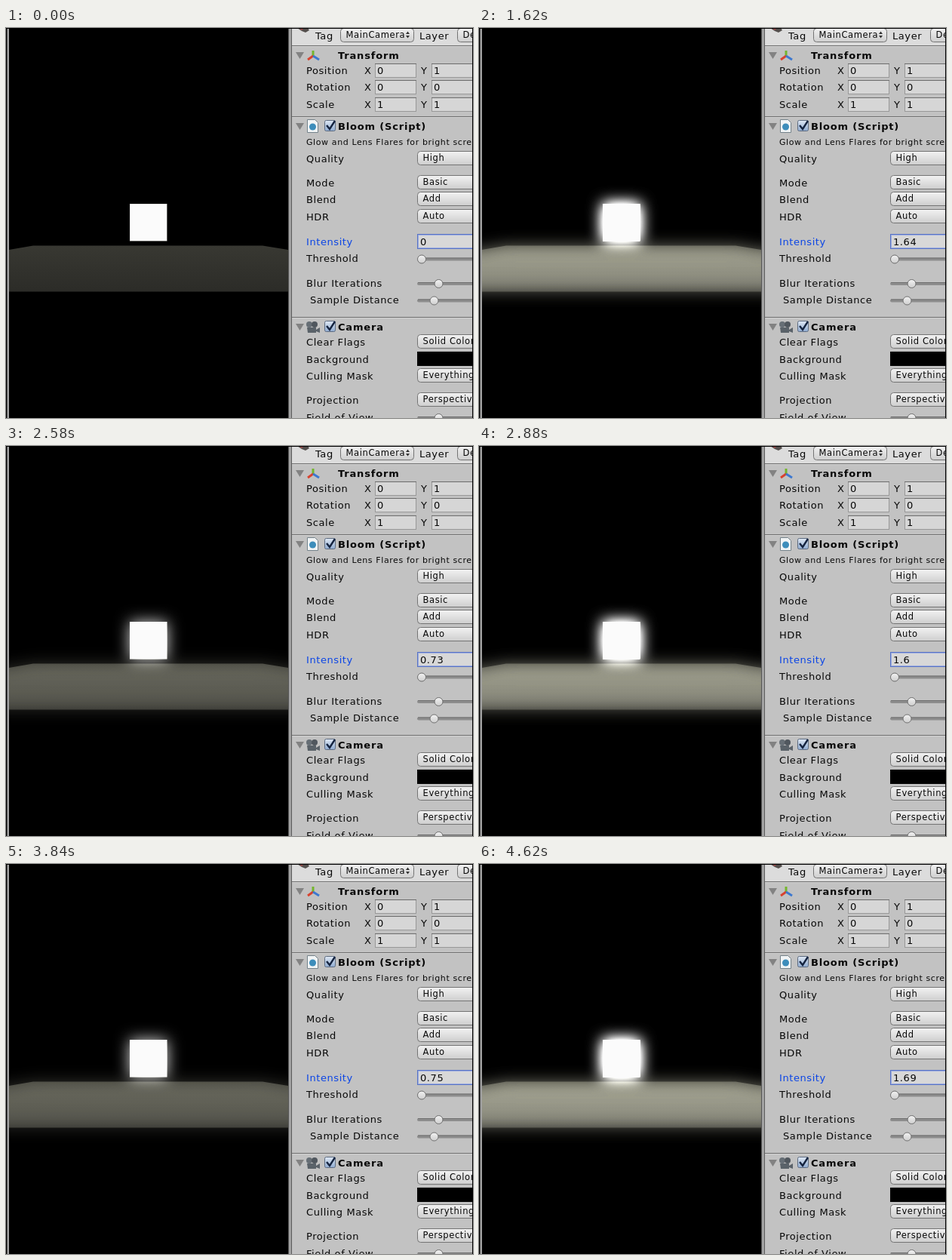
Recreate the animation shown at these times as an HTML page with a canvas. Size 619 by 517 pixels, loop 5760 ms.

```html
<!DOCTYPE html>
<html lang="en">
<head>
<meta charset="utf-8">
<title>Bloom intensity</title>
<style>
  html, body { margin: 0; width: 100%; height: 100%; overflow: hidden; background: #000; }
  canvas, svg { position: absolute; left: 0; top: 0; display: block; }
  text { font-family: "DejaVu Sans", sans-serif; font-size: 13px; letter-spacing: .58px; fill: #080808; white-space: pre; }
  .head { font-weight: bold; letter-spacing: .82px; }
  .small { font-size: 11px; letter-spacing: .6px; }
  .pick { font-size: 11.5px; letter-spacing: .62px; }
  .active { fill: #0b45e6; }
</style>
</head>
<body>
<canvas id="scene" width="619" height="517"></canvas>
<svg id="panel" width="619" height="517" viewBox="0 0 619 517"></svg>
<script>
const LOOP = 5760, STEP = 60;
const VIEW = { x: 4, y: 1, w: 370, h: 516 };
const GLOW = 1.18;

// Dragged intensity values: start time, then one value per step; the last one holds.
const runs = [
  [0, [0]],
  [1320, [.51, .85, 1.14, 1.36, 1.52, 1.64, 1.72, 1.77, 1.79]],
  [2160, [1.76, 1.69, 1.58, 1.43, 1.26, 1.08, .9, .73, .58, .47,
          .71, 1.12, 1.6, 1.94, 2.13, 2.25, 2.32, 2.36, 2.38, 2.39]],
  [3420, [2.31, 2.17, 1.97, 1.72, 1.46, 1.2, .96, .75, .58, .46,
          .39, .35, .41, .52, .68, .93, 1.2, 1.44, 1.6, 1.7, 1.69]]
];

function intensityAt(t) {
  const [start, values] = runs.filter(r => r[0] <= t).pop();
  return values[Math.min(values.length - 1, Math.floor((t - start) / STEP))];
}

// ---- Inspector panel ----
const parts = [];
const add = s => parts.push(s);
const rect = (x, y, w, h, fill, more = '') =>
  add(`<rect x="${x}" y="${y}" width="${w}" height="${h}" fill="${fill}" ${more}/>`);
const path = (d, fill, more = '') => add(`<path d="${d}" fill="${fill}" ${more}/>`);
const text = (x, y, s, cls = '', more = '') =>
  add(`<text x="${x}" y="${y}" class="${cls}" ${more}>${s}</text>`);

function field(x, y, w, value) {
  rect(x + .5, y + .5, w, 18, '#d6d6d6', 'stroke="#989898"');
  rect(x, y, w + 1, 1, '#6c6c6c');
  text(x + 3, y + 14, value);
}
function popup(x, y, w, label) {
  rect(x + .5, y + .5, w, 18, 'url(#btn)', 'rx="4" stroke="#747474"');
  text(x + 7.5, y + 13, label, 'pick');
}
function slider(y, knob) {
  rect(545, y - 2, 90, 4, '#8d8d8d', 'rx="2"');
  rect(546, y - 2, 90, 1, '#6e6e6e');
  add(`<circle cx="${knob}" cy="${y}" r="5.5" fill="url(#btn)" stroke="#6d6d6d"/>`);
}
function divider(y) {
  rect(379, y, 240, 1, '#6e6e6e');
  rect(379, y + 1, 240, 1, '#d2d2d2');
}
const fold = y => path(`M384 ${y - 4}h11l-5.5 9z`, '#828282');
function checkbox(y) {
  rect(422.5, y + .5, 14, 14, 'url(#check)', 'rx="2" stroke="#5d6b80"');
  path(`M425 ${y + 7}l4 5l7-11`, 'none', 'stroke="#14233f" stroke-width="2.4"');
}
const gradient = (id, from, to) =>
  `<linearGradient id="${id}" x2="0" y2="1"><stop stop-color="${from}"/><stop offset="1" stop-color="${to}"/></linearGradient>`;

add(`<defs>${gradient('btn', '#f2f2f2', '#cecece')}${gradient('check', '#dfe8f4', '#8fabd0')}</defs>`);
rect(1, 1, 1, 516, '#555');
rect(2, 1, 2, 516, '#a3a3a3');
rect(374, 1, 1, 516, '#555');
rect(375, 1, 3, 516, '#a3a3a3');
rect(378, 1, 1, 516, '#5a5a5a');
rect(379, 1, 240, 516, '#c2c2c2');

rect(379, 1, 240, 22, '#dcdcdc');
path('M386 0h14l2 3-5 3-5-2z', '#55504e');
path('M388 0h7l-3 3z', '#a04a48');
text(410, 15, 'Tag');
popup(443, 0, 97, 'MainCamera');
path('M530 8l2.5-3.5 2.5 3.5zM530 10l2.5 3.5 2.5-3.5z', '#333');
text(548, 15, 'Layer');
popup(598, 0, 60, 'Default');
divider(23);

fold(36);
path('M407 38V30', 'none', 'stroke="#74b62c" stroke-width="3"');
path('M407 37l-7 5', 'none', 'stroke="#d8432f" stroke-width="3"');
path('M407 37l8 5', 'none', 'stroke="#3c78d0" stroke-width="3"');
text(440, 41, 'Transform', 'head');
[['Position', 0, 1], ['Rotation', 0, 0], ['Scale', 1, 1]].forEach(([name, x, y], i) => {
  const top = 47 + Math.round(i * 22.4);
  text(398, top + 14, name);
  text(475, top + 14, 'X');
  field(489, top, 54, x);
  text(550, top + 14, 'Y');
  field(564, top, 70, y);
});
divider(117);

fold(130);
path('M399.5 121.5h10l4 4v13h-14z', '#f1f4f5', 'stroke="#74828a"');
add('<circle cx="406.5" cy="131" r="4.5" fill="#3d8dbb"/>');
checkbox(122);
text(440, 135, 'Bloom (Script)', 'head');
text(398, 155, 'Glow and Lens Flares for bright screen pixels', 'small');

const choices = [
  ['Quality', 178, 'High'], ['Mode', 210, 'Basic'], ['Blend', 232, 'Add'], ['HDR', 255, 'Auto'],
  ['Clear Flags', 421, 'Solid Color'], ['Culling Mask', 466, 'Everything'], ['Projection', 498, 'Perspective']
];
for (const [name, y, value] of choices) {
  text(398, y, name);
  popup(545, y - 15, 110, value);
}
text(398, 288, 'Intensity', 'active');
rect(545.5, 273.5, 90, 19, '#d8d8d8', 'stroke="#5873c4"');
rect(546.5, 274.5, 90, 17, 'none', 'stroke="#9cace0"');
text(549, 288, '0', '', 'id="value"');
text(398, 310, 'Threshold');
slider(306.5, 551);
text(398, 343, 'Blur Iterations');
slider(339, 573.5);
text(403, 365, 'Sample Distance');
slider(361.5, 567.5);
divider(383);

fold(396);
path('M399 397h12v3l5-3v7l-5-2v2h-11z', '#5a6269');
add('<circle cx="402" cy="393" r="4" fill="#666e75"/><circle cx="409" cy="393" r="4" fill="#50575e"/>');
checkbox(388);
text(440, 401, 'Camera', 'head');
text(398, 444, 'Background');
rect(545, 429, 90, 19, '#000');
text(398, 521, 'Field of View');
slider(517, 573.5);
rect(618, 0, 1, 517, '#000');
rect(0, 0, 619, 1, '#000');
document.getElementById('panel').innerHTML = parts.join('');

// ---- Game view: the scene plus its own blur, added by intensity ----
const PAD = 80;
function layer(draw) {
  const c = document.createElement('canvas');
  c.width = VIEW.w + 2 * PAD;
  c.height = 517;
  draw(c.getContext('2d'));
  return c;
}
const base = layer(g => {
  g.fillStyle = '#000';
  g.fillRect(0, 0, 600, 517);
  g.translate(PAD - VIEW.x, 0);
  const shade = g.createLinearGradient(0, 289, 0, 349);
  shade.addColorStop(0, '#383832');
  shade.addColorStop(1, '#2c2c28');
  g.fillStyle = shade;
  g.beginPath();
  // The slab runs on past both sides so the blur does not fade there.
  [[-90, 349.5], [-90, 294], [4, 294], [36, 288.5], [340, 288.5], [374, 294], [470, 294], [470, 349.5]]
    .forEach(p => g.lineTo(...p));
  g.fill();
  g.fillStyle = '#c9c9c6';
  g.fillRect(164, 233, 49.5, 49.5);
  g.fillStyle = '#fbfbfb';
  g.fillRect(164.5, 233.5, 48.5, 48.5);
});
const glow = layer(g => {
  g.filter = 'blur(10.3px)';
  g.drawImage(base, 0, 0);
});

const ctx = document.getElementById('scene').getContext('2d');
const value = document.getElementById('value');
let shown = -1;

function paint(intensity) {
  ctx.save();
  ctx.beginPath();
  ctx.rect(VIEW.x, VIEW.y, VIEW.w, VIEW.h);
  ctx.clip();
  ctx.drawImage(base, VIEW.x - PAD, 0);
  ctx.globalCompositeOperation = 'lighter';
  for (let left = intensity * GLOW; left > 0; left--) {
    ctx.globalAlpha = Math.min(1, left);
    ctx.drawImage(glow, VIEW.x - PAD, 0);
  }
  // Highlights stop just short of pure white.
  ctx.globalAlpha = 1;
  ctx.globalCompositeOperation = 'darken';
  ctx.fillStyle = '#fbfbfb';
  ctx.fillRect(VIEW.x, VIEW.y, VIEW.w, VIEW.h);
  ctx.restore();
  value.textContent = intensity;
}
function tick() {
  const now = intensityAt(performance.now() % LOOP);
  if (now !== shown) paint(shown = now);
  requestAnimationFrame(tick);
}
tick();
</script>
</body>
</html>
```
